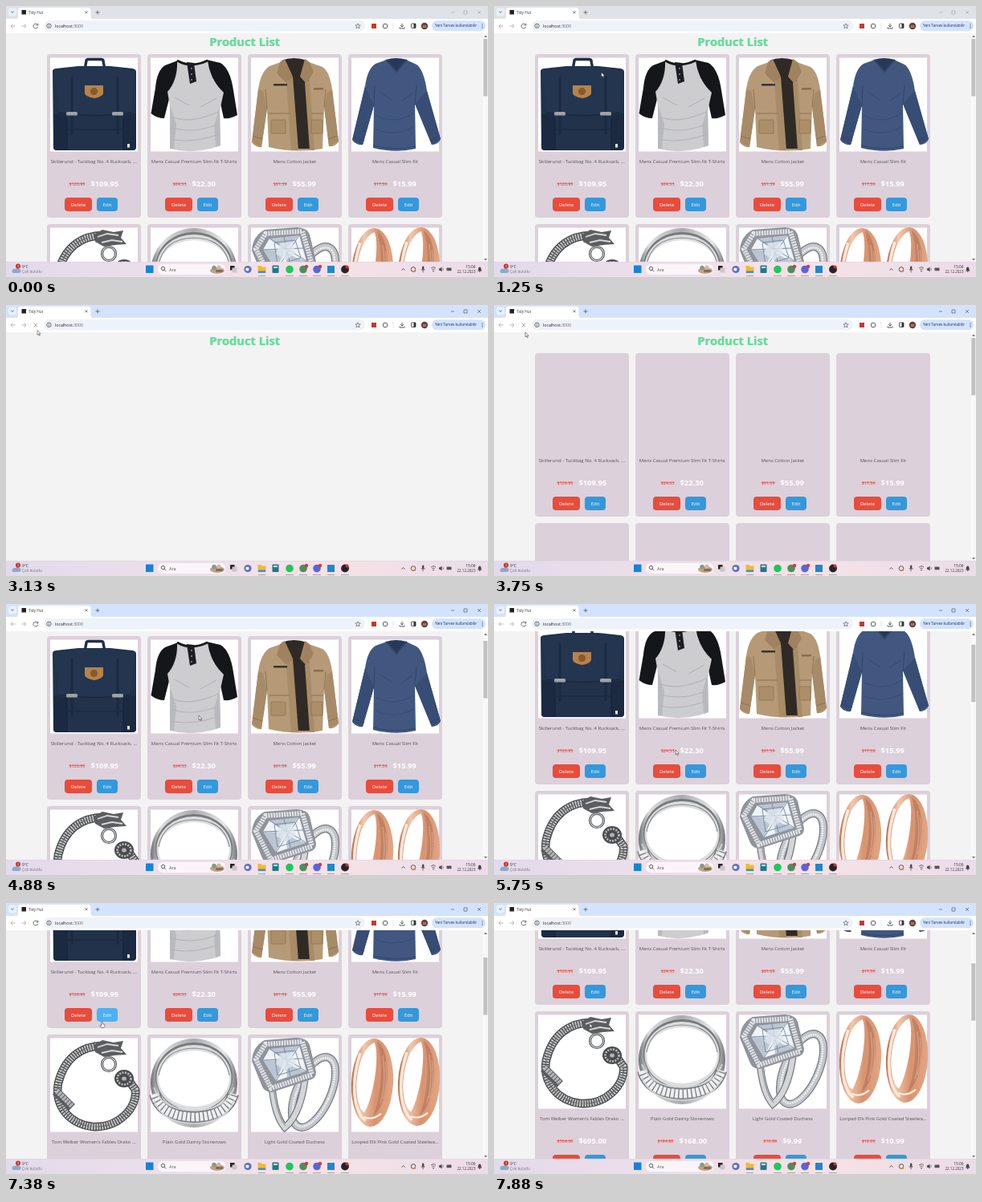
Write an HTML page that moves like this. It is 600x338 px and loops after 8000 ms.

```html
<!DOCTYPE html>
<html lang="tr">
<head>
<meta charset="utf-8">
<title>Product List</title>
<style>
html, body { margin: 0; width: 100%; height: 100%; overflow: hidden; background: #f3f3f3; }
svg { display: block; width: 600px; height: 338px; font-family: "Open Sans", "Noto Sans", sans-serif; }
.old { text-decoration: line-through; }
</style>
</head>
<body>
<svg id="stage" viewBox="0 0 600 338"></svg>
<script>
const LOOP = 8000, STEP = 125;

const rect = (x, y, w, h, fill, r = 0, more = '') =>
  `<rect x="${x}" y="${y}" width="${w}" height="${h}" rx="${r}" fill="${fill}" ${more}/>`;
const dot = (x, y, r, fill, more = '') => `<circle cx="${x}" cy="${y}" r="${r}" fill="${fill}" ${more}/>`;
const oval = (x, y, rx, ry, fill, more = '') =>
  `<ellipse cx="${x}" cy="${y}" rx="${rx}" ry="${ry}" fill="${fill}" ${more}/>`;
const shape = (d, fill, more = '') => `<path d="${d}" fill="${fill}" ${more}/>`;
const line = (d, color, w = 0.8, more = '') =>
  `<path d="${d}" fill="none" stroke="${color}" stroke-width="${w}" ${more}/>`;
const text = (x, y, s, size, fill, more = '') =>
  `<text x="${x}" y="${y}" font-size="${size}" fill="${fill}" ${more}>${s}</text>`;
const group = (id, s, more = '') => `<g id="${id}" ${more}>${s}</g>`;
const MID = 'text-anchor="middle"', END = 'text-anchor="end"';

// Product pictures
const backpack =
  line('M98 79L100 68.5Q100 66.5 103 66.5L118 66.5Q121 66.5 121 68.500L123 79', '#1f3048', 3.4) +
  shape('M58 81Q58 79 62 78L90 75H130L158 78Q162 79 162 82L162 176Q162 180 157 180H64Q59 180 59 176Z', '#21324a') +
  shape('M60 81L92 76H130L160 81L156 133Q110 139 65 133Z', '#24364f') +
  shape('M59 134L76 136V180H63Q59 180 59 176ZM146 136L162 134L162 176Q162 180 157 180H146Z', '#1b2a41') +
  line('M65 133Q110 140 156 133M76 139V180M146 139V180M77 154H146', '#17243a', 1.1) +
  line('M82 88V160M139 88V160', '#1b2a41', 3) +
  rect(75, 132, 14, 4.5, '#9da3a8', 1.6) + rect(132, 132, 14, 4.5, '#9da3a8', 1.6) +
  shape('M98 99H121V109Q120 113 110 115Q99 113 98 109Z', '#b5834c') +
  dot(109.5, 106.5, 4.6, '#87592c') + rect(151, 172, 3, 4.5, '#e8e8e8');

const tee =
  shape('M214 68L198 74Q188 80 186 102L180.5 134Q188 140 197 140L205 108L220 74ZM250 67L267 71Q279 78 283 105L288 136Q280 141 271 140L264 108L244 72Z', '#15161a') +
  shape('M213 68Q230 75 251 68Q254 92 271 108L266 130L267 174Q236 186 204 178L205 130L201 107Q214 92 213 68Z', '#cdcdd0') +
  shape('M204 122L212 148L209 178L204 178ZM266 126L259 150L261 176L267 174Z', '#b9babe') +
  line('M213 68Q230 78 251 68', '#18181c', 3) +
  shape('M225 70L234 71L237 94L229 97Z', '#1c1d22') +
  [78, 85, 92].map(y => dot(231, y, 0.8, '#ddd')).join('') +
  line('M206 138Q230 148 264 132M207 152Q236 160 264 147M206 166Q230 172 265 160M210 114L228 124M262 115L242 126', '#b3b4b9', 1.1);

const jacket =
  shape('M342 70L328 75Q317 82 314 104L306 170Q311 177 318 176L325 128L327 176Q360 184 394 178L396 126L402 175Q410 176 414 169L406 104Q403 82 394 76L377 70Z', '#b69a77') +
  shape('M314 104L320 106L325 128L318 176L306 170ZM406 104L400 108L396 126L402 175L414 169Z', '#a78b68') +
  shape('M343 68Q358 62 375 68L377 92L380 178H361L352 95Z', '#2f2a25') +
  shape('M341 70L347 66L357 88L349 96L337 84ZM378 70L372 66L366 88L374 97L383 82Z', '#a18260') +
  shape('M349 95L357 88L364 180H355ZM372 96L378 92L384 180H378Z', '#a88c68') +
  rect(333, 97, 17, 2.5, '#3c342b') + rect(383, 102, 12, 2.5, '#8a6e4e') +
  rect(330, 142, 18, 17, '#ac8e69', 1, 'stroke="#8c7050" stroke-width=".7"') +
  rect(380, 142, 14, 17, '#ac8e69', 1, 'stroke="#8c7050" stroke-width=".7"') +
  line('M327 134H353M380 134H395M325 128L323 104M396 126L398 104M307 162L319 166M401 166L413 162', '#8a6f50', 0.9);

const sweater =
  shape('M474 67L460 72Q450 78 447 100L431 167Q436 174 444 173L458 124L457 177Q485 184 510 178L509 122L530 173Q538 173 541 166L524 106Q520 79 511 73L498 67Z', '#41577f') +
  shape('M447 100L458 124L444 173L431 167ZM524 106L509 122L530 173L541 166Z', '#384d73') +
  shape('M473 67Q485 63 499 67L486 82Z', '#27395a') +
  line('M473 67L486 82L499 67', '#324768', 2) +
  line('M458 124L459 99M509 122L511 99M457 174Q484 181 510 175M432 163L446 168M528 168L540 162', '#2f4467', 1) +
  line('M466 108L481 118M506 109L492 119M461 137Q485 148 507 134M461 154Q485 163 508 151', '#374d75', 1.2);

const chain = 'M122 149C92 149 72 166 65 196C60 225 80 247 108 250C140 252 164 226 161 204L150 188';
const bracelet =
  line(chain, '#47484a', 10.5) + line(chain, '#c6c7c8', 8, 'stroke-dasharray="1.9 1.3"') +
  line(chain, '#66676a', 1.4, 'stroke-dasharray="2 1.6"') +
  line('M62 206L82 226', '#5a5c60', 11) + line('M63 205L82 224', '#b4b5b7', 6.5, 'stroke-dasharray="3 1"') +
  dot(128, 172, 8.500, 'none', 'stroke="#55585c" stroke-width="3.2"') +
  dot(128, 172, 8.500, 'none', 'stroke="#d2d3d4" stroke-width="1.1"') +
  shape('M109 148L120 142L134 145L146 143L143 152L150 160L136 161L122 163L111 157Z', '#5b5d60') +
  line('M114 151L126 147L140 149M119 158L132 155L145 157', '#d6d7d8', 1.8) +
  oval(147, 190, 12, 11, '#4a4b4e') + oval(147, 190, 8.5, 7.5, 'none', 'stroke="#bfc0c2" stroke-width="2.5" stroke-dasharray="2 1.5"') +
  oval(147, 190, 3, 2.6, '#b0b1b3');

const stones = 'M185 209Q192 237 234 238Q276 237 283 209';
const ring =
  oval(234, 195.5, 54, 55.5, 'url(#silver)') + oval(234, 188, 48, 43, '#77797c') +
  oval(234, 189, 46.5, 41, '#dcddde') + oval(234, 190, 44, 35, '#fff') +
  line('M190 186Q196 153 234 152Q272 153 278 186', '#8d8f92', 1.2) +
  line(stones, '#77797d', 14) + line(stones, '#eeeff0', 11, 'stroke-dasharray="4 1.300"') +
  line('M184 201Q194 229 234 230Q274 229 284 201M184 217Q194 245 234 246Q274 245 284 217', '#d4d5d7', 1.6);

const gem =
  oval(383, 207, 21, 47, 'none', 'transform="rotate(24 383 207)" stroke="#777b80" stroke-width="10"') +
  oval(383, 207, 21, 47, 'none', 'transform="rotate(24 383 207)" stroke="#c3c6ca" stroke-width="7.5"') +
  oval(383, 207, 20, 46, 'none', 'transform="rotate(24 383 207)" stroke="#f0f1f3" stroke-width="2.5" stroke-dasharray="2 1"') +
  line('M331 198Q334 236 347 251Q366 236 372 192', '#74787d', 9) +
  line('M331 198Q334 236 347 251Q366 236 372 192', '#d3d5d8', 6.500) +
  line('M333 198Q336 234 348 249', '#8e9297', 1.2) +
  shape('M322 142L362 139Q376 140 378 148L386 182Q386 190 377 192L331 207Q322 207 319 200L306 168Q307 150 322 142Z', '#8f939b') +
  line('M323 147L369 144L381 185L330 202L311 166Z', '#e3e5e9', 6, 'stroke-dasharray="2.2 1.1"') +
  shape('M328 153L365 149L374 181L336 193L320 167Z', '#bcc6d3') +
  shape('M328 153L347 168L320 167ZM365 149L347 168L359 176L374 181ZM336 193L347 168L350 188Z', '#f0f4f8') +
  line('M328 153L374 181M365 149L336 193M320 167L370 165M346 151L354 187M334 158L360 155L367 177L338 186Z', '#75849a', 0.9) +
  shape('M341 159L356 157L361 171L348 180L336 172Z', '#dfe6ef', 'opacity=".8"');

const hoop = (x, y, turn) => `<g transform="translate(${x} ${y}) rotate(${turn})">` +
  oval(0, 0, 26, 55, 'url(#rose)') +
  shape('M0 -50C-24 -38 -25 28 -8 38C2 20 8 -34 0 -50Z', '#fff') +
  shape('M3 -51C23 -42 24 24 3 42C12 18 13 -30 3 -51Z', '#c08063') +
  line('M11 -34Q18 0 11 26M15 -27Q20 0 14 20', '#e8b79d', 1.6, 'stroke-dasharray="1 1"') +
  line('M-17 -36C-28 6 -20 38 -6 48', '#ffe8da', 3.500) +
  line('M-8 43Q2 48 13 38', '#fff0e6', 2) + '</g>';
const earrings = hoop(456, 195, 3) + hoop(514, 194, 3);

const items = [
  ['Skillerund - Tuckbag No. 4 Rucksack, …', '120.95', '109.95', backpack],
  ['Mens Casual Premium Slim Fit T-Shirts', '24.53', '22.30', tee],
  ['Mens Cotton Jacket', '61.59', '55.99', jacket],
  ['Mens Casual Slim Fit', '17.59', '15.99', sweater],
  ["Tom Welber Women's Fables Drako …", '764.50', '695.00', bracelet],
  ['Plain Gold Dainty Stonerows', '184.80', '168.00', ring],
  ['Light Gold Coated Duchess', '10.99', '9.99', gem],
  ['Looped Elk Pink Gold Coated Steelwa…', '12.09', '10.99', earrings]
];

function card([name, was, now], i) {
  const x = 51 + 125 * (i % 4), y = 60 + 212 * Math.floor(i / 4), mid = x + 58.3;
  return rect(x, y, 117, 204, '#dcd0db', 4) +
    text(mid, y + 135.7, name, 6, '#555', MID) +
    `<text x="${mid}" y="${y + 163.6}" ${MID}><tspan class="old" font-size="5.4" fill="#e8382c">$${was}</tspan>` +
    `<tspan dx="7" dy="1.4" font-size="9.4" font-weight="700" fill="#fff">$${now}</tspan></text>` +
    rect(x + 22, y + 179, 34, 17, '#e74c3c', 4) + text(x + 39, y + 189.7, 'Delete', 6, '#fff', MID) +
    rect(x + 62, y + 179, 26, 17, '#3498db', 4, `id="edit${i}"`) + text(x + 75, y + 189.7, 'Edit', 6, '#fff', MID);
}

function picture([, , , art], i) {
  const row = Math.floor(i / 4);
  return rect(55 + 125 * (i % 4), 64.5 + 212 * row, 109, 117, '#fff') +
    `<g transform="translate(0 ${137 * row})">${art}</g>`;
}

const page =
  rect(0, 34, 600, 285, '#f3f3f3') +
  group('page',
    text(297.8, 50.2, 'Product List', 14.7, '#b4cfd8', MID + ' font-weight="700"') +
    text(297, 49.5, 'Product List', 14.7, '#5fe092', MID + ' font-weight="700"') +
    group('cards', items.map(card).join('') + group('pictures', items.map(picture).join('')))) +
  group('bar', rect(593.5, 34, 6.5, 285, '#f8f8f8') + rect(594.3, 41, 5, 71.5, '#c1c1c1', 0, 'id="thumb"') +
    shape('M595 39L597 36.5L599 39ZM595 315L597 317.5L599 315Z', '#777'));

const INK = '#45484d';
const browser =
  rect(0, 0, 600, 17, '#d3e3fd', 0, 'id="strip"') + rect(3, 2.5, 10, 10, '#e8f0fe', 3) + line('M6.3 6.8L8 8.4L9.7 6.8', INK) +
  shape('M12 16.5Q15 16 15 13V5Q15 2 18 2H102Q105.5 2 105.5 5V13Q105.5 16 109 16.5Z', '#fff') +
  rect(19.5, 5, 5.5, 5.5, '#222', 0, 'id="favicon"') +
  group('spinner', dot(22, 8, 2.7, 'none', 'stroke="#3670d6" stroke-width="1" stroke-dasharray="12 5"')) +
  text(28, 9.8, 'Tidy Hut', 4.7, '#333') +
  line('M98.5 6.3L101.5 9.3M101.5 6.3L98.5 9.3M111.5 8H116.5M114 5.5V10.5', INK, 0.7) +
  group('controls', line('M554 8H558M587 6L591 10M591 6L587 10M570 6H574V10H570Z', '#444', 0.6)) +
  rect(0, 16, 600, 18, '#fff') +
  line('M11.5 25H6M8.5 22.5L6 25L8.5 27.5M19.5 25H25M22.5 22.5L25 25L22.5 27.5', '#aaa') +
  dot(37, 25, 6, '#e6e8ec', 'id="halo"') +
  group('reload', line('M39.3 23.3A2.9 2.9 0 1 0 39.7 26M39.8 21.8V24H37.6', INK)) +
  group('stop', line('M34.7 22.7L39.3 27.3M39.3 22.7L34.7 27.3', 'currentColor', 0.9)) +
  rect(47, 18, 400, 13.5, '#eef2f9', 6.7) + dot(53.5, 24.8, 2.7, 'none', 'stroke="#333" stroke-width=".7"') +
  line('M53.5 24.5V26.3M53.5 23V23.7', '#333', 0.7) +
  text(61, 26.7, 'localhost<tspan fill="#666">:3000</tspan>', 5.2, '#222') +
  shape('M438 21.8L438.9 23.9L441.2 24.1L439.5 25.6L440 27.8L438 26.6L436 27.8L436.5 25.6L434.8 24.1L437.1 23.9Z', 'none', 'stroke="#444" stroke-width=".6"') +
  rect(455, 22, 6, 6, '#c8372d') + rect(469.5, 22.5, 5, 5, 'none', 1, 'stroke="#444" stroke-width=".9"') +
  line('M482 21V29', '#cddaf0', 0.7) +
  line('M493 21.8V26M491 24.2L493 26.2L495 24.2M490 26.5V28H496V26.5', '#333') +
  rect(504.5, 22, 5.5, 5.5, 'none', 0.7, 'stroke="#333" stroke-width=".8"') + rect(507.5, 22, 2.5, 5.5, '#333') +
  dot(521, 25, 4.2, '#6d4037') + text(521, 26.5, 'M', 4, '#fff', MID) +
  rect(530, 18.3, 67, 13, '#d3e3fd', 6.5) + text(534, 26.4, 'Yeni Tarvex kullanılabilir', 4.7, '#17305e') +
  [22.7, 24.8, 26.9].map(y => dot(593, y, 0.55, '#17305e')).join('');

const badge = x => dot(x, 325, 2.2, '#d43a3a');
const taskbar =
  rect(0, 319, 600, 19, 'url(#task)') + line('M0 319.3H600', '#ddd0de', 0.6) +
  shape('M9 333Q6.5 332 8 329.5Q9 327 12 328Q14 325.5 16.5 328Q19 328.5 18.5 331Q18 333 16 333Z', '#8ea9c6') +
  dot(15, 324.5, 3, '#c8342f') + text(15, 326, '3', 4, '#fff', MID) +
  text(20, 326.8, '9°C', 4.8, '#333') + text(20, 333.4, 'Çok bulutlu', 4.7, '#777') +
  rect(174, 323.5, 9.5, 9.5, '#1683d8', 0.5) +
  rect(188.5, 321.5, 85.5, 14, '#fbf5f9', 7, 'stroke="#e3d5df" stroke-width=".5"') +
  dot(195.5, 327.5, 2.2, 'none', 'stroke="#333" stroke-width=".8"') + line('M197 329.2L199 331.2', '#333', 0.8) +
  text(203, 330.5, 'Ara', 5.5, '#555') +
  oval(263, 330, 9, 4, '#c3a189') + dot(259, 326.5, 2.7, '#7f9c86') + dot(265, 326, 2.5, '#d4b99a') + rect(261, 329, 9, 3, '#80705f', 1) +
  rect(279, 324, 5.5, 5.5, '#222') + rect(281.5, 326.5, 6, 6, '#c9c6cc') +
  dot(301, 328.5, 4.6, '#5a6fc5') + rect(298.5, 326.8, 3.8, 3.4, '#fff', 0.7) +
  shape('M313.5 324H317.5L318.5 325.5H323.5V333H313.5Z', '#f4b92f') + rect(314, 330.5, 9, 2.5, '#3b8fd5') +
  rect(331.5, 323.5, 8, 9.5, '#21788a', 1) + rect(333, 325, 5, 2, '#bfe8ee') +
  dot(353, 328.5, 4.8, '#1fc75c') + dot(370, 328.5, 4.8, '#4f8d5d') + badge(374) +
  dot(387, 328.5, 4.8, '#5765dd') + badge(391) +
  rect(400, 324, 9, 9, '#1f87cf') + dot(422, 328.5, 4.9, '#24242a') + dot(424.5, 325.5, 2, '#dd2929') +
  line('M348 336.5H358M365 336.5H375M382 336.5H392M400 336.5H409M417 336.5H427M314 336.5H323', '#9a8f99', 0.8) +
  line('M492.5 329.5L494.5 327.5L496.5 329.5', '#333') +
  dot(507, 328.5, 2.8, 'none', 'stroke="#555" stroke-width="1"') + dot(509, 330.5, 1.3, '#e28a2e') +
  rect(518, 324.5, 2.3, 5, '#444', 1.1) + line('M516.7 328Q519.1 333 521.5 328M519.1 331V332.5', '#444', 0.6) +
  line('M529 327Q532 324 535 327M530.3 329Q532 327.2 533.7 329', '#444', 0.8) + dot(532, 330.8, 0.8, '#444') +
  shape('M539 327.3H540.5L542.5 325.5V331.5L540.5 329.7H539Z', '#444') + line('M543.7 327Q545 328.5 543.7 330', '#444', 0.6) +
  rect(548.5, 326.5, 6, 3.7, '#555', 0.8) +
  text(584.5, 326.8, '15:06', 4.8, '#333', END) + text(584.5, 333.4, '22.12.2023', 4.5, '#333', END) +
  shape('M587 330.5Q588 329.5 588 327.5Q588 325.5 589.7 325.5Q591.4 325.5 591.4 327.5Q591.4 329.5 592.4 330.5Z', '#444') + dot(589.7, 331.3, 0.8, '#444');

const overlay =
  group('tip', rect(43, 33, 57, 8.5, '#fff', 0, 'stroke="#888" stroke-width=".5"') +
    text(46, 38.9, 'Bu sayfayı yeniden yükle', 4.3, '#555')) +
  group('arrow', shape('M0 0V5.8L1.4 4.6L2.4 6.8L3.3 6.4L2.3 4.3H4.1Z', '#fff', 'stroke="#222" stroke-width=".5"')) +
  group('hand', shape('M-.7 0Q0 -.7 .7 0V2.3L3.3 3V5Q3 6.5 2.5 7H-.8L-2.5 4.3L-1.8 3.7L-.7 4.5Z', '#fff', 'stroke="#222" stroke-width=".5"'));

const stops = list => list.map(([at, color]) => `<stop offset="${at}" stop-color="${color}"/>`).join('');
const stage = document.getElementById('stage');
stage.innerHTML = '<defs>' +
  `<linearGradient id="silver">${stops([[0, '#6f7275'], [0.12, '#dcddde'], [0.5, '#a9abae'], [0.85, '#e8e8e9'], [1, '#75787c']])}</linearGradient>` +
  `<linearGradient id="rose">${stops([[0, '#b8704f'], [0.25, '#f3c8ae'], [0.6, '#d8936f'], [1, '#e3a684']])}</linearGradient>` +
  `<linearGradient id="task">${stops([[0, '#e2daeb'], [0.4, '#efe0ea'], [0.7, '#f4e2e6'], [1, '#ecdce9']])}</linearGradient></defs>` +
  page + browser + taskbar + overlay;

const $ = id => document.getElementById(id);
const show = (id, on) => { $(id).style.display = on ? '' : 'none'; };
const move = (id, x, y) => $(id).setAttribute('transform', `translate(${x} ${y})`);

// Rows of time and values, joined by straight lines
const scrollPath = [[4625, 0], [4750, 8], [4875, 20], [5000, 34], [5125, 39], [7000, 39],
  [7125, 60], [7250, 85], [7375, 108], [7500, 120], [7625, 129], [7875, 137]];
const cursorPath = [[250, 400, 300], [1000, 180, 110], [1750, 41, 28], [2250, 39, 26.5], [2625, 39, 26.5],
  [3375, 39, 34], [3875, 39, 34], [4375, 160, 100], [4875, 240, 139], [5500, 250, 190],
  [6125, 190, 170], [6875, 116, 143], [7000, 116, 143], [7375, 119.5, 148.5], [7875, 119, 150]];

function along(path, t) {
  const n = path.findIndex(p => p[0] > t);
  if (n === 0) return path[0].slice(1);
  if (n < 0) return path[path.length - 1].slice(1);
  const a = path[n - 1], b = path[n], k = (t - a[0]) / (b[0] - a[0]);
  return a.slice(1).map((v, i) => v + (b[i + 1] - v) * k);
}
const within = (t, from, to) => t >= from && t < to;

function draw(now) {
  const t = Math.floor(now % LOOP / STEP) * STEP;
  const [scroll] = along(scrollPath, t), [x, y] = along(cursorPath, t);
  const blank = within(t, 2750, 3375), busy = within(t, 2125, 3875), spin = within(t, 2125, 3125);
  const over = x > 113 && x < 139 && y > 239 - scroll && y < 258 - scroll;
  const focused = t >= 1500;

  move('page', 0, -scroll);
  $('thumb').setAttribute('y', 41 + scroll * 0.25);
  $('strip').setAttribute('fill', focused ? '#d3e3fd' : '#dfe3e7');
  $('controls').style.opacity = focused ? 1 : 0.45;
  show('cards', !blank);
  show('pictures', !within(t, 2750, 3875));
  show('bar', !blank);
  show('reload', !busy);
  show('stop', busy);
  $('stop').style.color = t < 2750 ? '#333' : '#aaa';
  show('halo', within(t, 1750, 2875));
  show('favicon', !spin);
  show('spinner', spin);
  $('spinner').setAttribute('transform', `rotate(${t * 0.36} 22 8)`);
  show('tip', within(t, 2250, 2750));
  $('edit0').setAttribute('fill', over ? '#4eb0f3' : '#3498db');
  show('arrow', t >= 250 && !over);
  show('hand', over);
  move('arrow', x, y);
  move('hand', x, y);
}

const start = performance.now();
function tick() {
  draw(performance.now() - start);
  requestAnimationFrame(tick);
}
tick();
</script>
</body>
</html>
```
